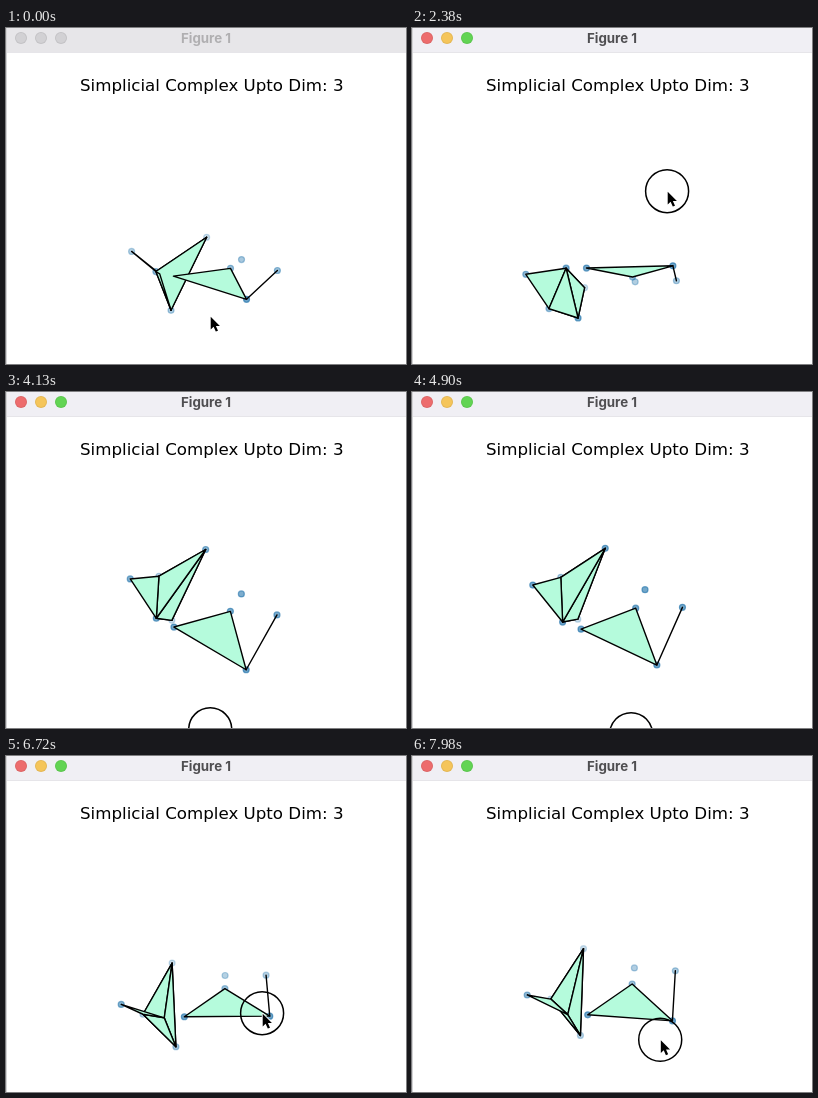
Animation, 400 px wide and 336 px high, one loop 8000 ms. Source, as an HTML page with a canvas:

```html
<!DOCTYPE html>
<html lang="en">
<head>
<meta charset="utf-8">
<title>Figure 1</title>
<style>
  html, body { margin: 0; width: 100%; height: 100%; overflow: hidden; background: #fff; }
  #stage { position: relative; width: 400px; height: 336px; overflow: hidden; background: #fff; }
  #bar { position: absolute; left: 0; top: 0; width: 400px; height: 24px; background: #e7e6e9; color: #b0afb1;
    border-bottom: 1px solid #e6e5e9; font: 700 13.3px/20px Inter, "Open Sans", sans-serif; text-align: center; }
  #bar i { position: absolute; top: 4px; width: 12px; height: 12px; border-radius: 50%;
    background: #d2d1d4; box-shadow: inset 0 0 0 1px rgba(0, 0, 0, .07); }
  #bar.on { background: #f0eff4; color: #4f4e51; }
  #bar.on i { background: var(--c); }
  #edge { position: absolute; left: 0; top: 0; width: 1px; height: 336px; background: #d3d3d5; }
  #head { position: absolute; left: 0; top: 46px; width: 411.6px; text-align: center; white-space: nowrap;
    font: 16.67px/24px "DejaVu Sans", sans-serif; color: #000; }
  canvas { position: absolute; left: 0; top: 0; }
</style>
</head>
<body>
<div id="stage">
  <div id="bar"><i style="left:9px;--c:#ed6c6d"></i><i style="left:29px;--c:#f5c55a"></i><i style="left:49px;--c:#62d453"></i>Figure 1</div>
  <div id="edge"></div>
  <div id="head">Simplicial Complex Upto Dim: 3</div>
  <canvas id="plot" width="400" height="336"></canvas>
</div>
<script>
const LOOP = 8000, STEP = 70, LAG = 140;
const FOCUS = 420, PRESS = 1190;
const CX = 209.5, CY = 222.9, DIST = 1665;
const TURN = 180 / 308; // degrees per dragged pixel
const bar = document.getElementById('bar');
const g = document.getElementById('plot').getContext('2d');

// Vertices around the centre of the axes; most lie in one level plane
const pts = {
  A: [-95, -8], B: [-74, 12, -55], C: [-43, 56], D: [-41, -20, -72], E: [-52, -30],
  F: [-32, -29], G: [10, 13], H: [53, -31], I: [11, 34], J: [53, 33]
};
const simplices = ['ABE', 'BCE', 'BDE', 'CDE', 'BCD', 'FGH', 'HJ'];

// Pointer path: time, x, y
const path = [
  [0, 205, 288], [350, 205, 289], [PRESS, 205, 243], [1400, 205, 243],
  [2050, 237, 180], [2380, 256, 163], [2650, 270, 186], [3050, 236, 326],
  [3430, 216, 323], [4200, 205, 338], [4900, 220, 342], [5530, 279, 320],
  [5800, 283, 291], [5950, 281, 290], [6720, 257, 257], [LOOP, 249, 284]
];

const slope = (i, c) => (path[i + 1][c] - path[i][c]) / (path[i + 1][0] - path[i][0]);

// Tangent that never overshoots a key
function tangent(i, c) {
  const a = slope(Math.max(0, i - 1), c), b = slope(Math.min(i, path.length - 2), c);
  return a * b <= 0 ? 0 : 2 * a * b / (a + b);
}

function pointer(t) {
  const i = path.findIndex(p => p[0] > t) - 1;
  const p = path[i], q = path[i + 1], h = q[0] - p[0];
  const s = (t - p[0]) / h, r = 1 - s;
  return [1, 2].map(c => p[c] * (1 + 2 * s) * r * r + q[c] * s * s * (3 - 2 * s) +
    h * s * r * (tangent(i, c) * r - tangent(i + 1, c) * s));
}

// The view starts at azimuth -60, elevation 30 and trails the drag a little
function camera(t) {
  const [x0, y0] = pointer(PRESS), [x, y] = pointer(Math.max(PRESS, t - LAG));
  const rad = Math.PI / 180;
  return [(-60 - TURN * (x - x0)) * rad, (30 + TURN * (y - y0)) * rad];
}

function project([x, y, z = -24], az, el) {
  const ca = Math.cos(az), sa = Math.sin(az), ce = Math.cos(el), se = Math.sin(el);
  const u = ca * x + sa * y, depth = ce * u + se * z, f = DIST / (DIST - depth);
  return { x: CX + f * (ca * y - sa * x), y: CY - f * (ce * z - se * u), depth };
}

function drawComplex(az, el) {
  const view = {};
  for (const k in pts) view[k] = project(pts[k], az, el);
  const all = Object.values(view).sort((a, b) => a.depth - b.depth);
  const far = all[0].depth, span = all[all.length - 1].depth - far;

  g.lineWidth = 1.2;
  g.fillStyle = g.strokeStyle = '#1f72aa';
  for (const p of all) {
    g.globalAlpha = 0.23 + 0.42 * (p.depth - far) / span;
    g.beginPath();
    g.arc(p.x, p.y, 3, 0, 7);
    g.fill();
    g.stroke();
  }
  g.globalAlpha = 1;

  g.lineWidth = 1.4;
  g.lineJoin = 'round';
  g.strokeStyle = '#000';
  g.fillStyle = '#b5fbdc';
  const mean = s => [...s].reduce((sum, k) => sum + view[k].depth, 0) / s.length;
  for (const s of [...simplices].sort((a, b) => mean(a) - mean(b))) {
    g.beginPath();
    for (const k of s) g.lineTo(view[k].x, view[k].y);
    g.closePath();
    if (s.length > 2) g.fill();
    g.stroke();
  }
}

const arrow = new Path2D('M0 0V12.6L2.9 9.9L5.1 14.8L7.3 13.9L5.2 9.1H9.2Z');

function drawPointer(x, y, pressed) {
  if (pressed) {
    g.lineWidth = 1.5;
    g.strokeStyle = '#000';
    g.beginPath();
    g.arc(x - 0.9, y + 0.2, 21.5, 0, 7);
    g.stroke();
  }
  g.save();
  g.translate(x - 0.3, y + 0.8);
  g.lineWidth = 1.8;
  g.strokeStyle = '#fff';
  g.stroke(arrow);
  g.fillStyle = '#000';
  g.fill(arrow);
  g.restore();
}

function draw(now) {
  const t = Math.floor((now % LOOP) / STEP) * STEP;
  bar.className = t >= FOCUS ? 'on' : '';
  g.clearRect(0, 0, 400, 336);
  drawComplex(...camera(t));
  drawPointer(...pointer(t), t >= PRESS);
}

const start = performance.now();
function tick() {
  draw(performance.now() - start);
  requestAnimationFrame(tick);
}
tick();
</script>
</body>
</html>
```
